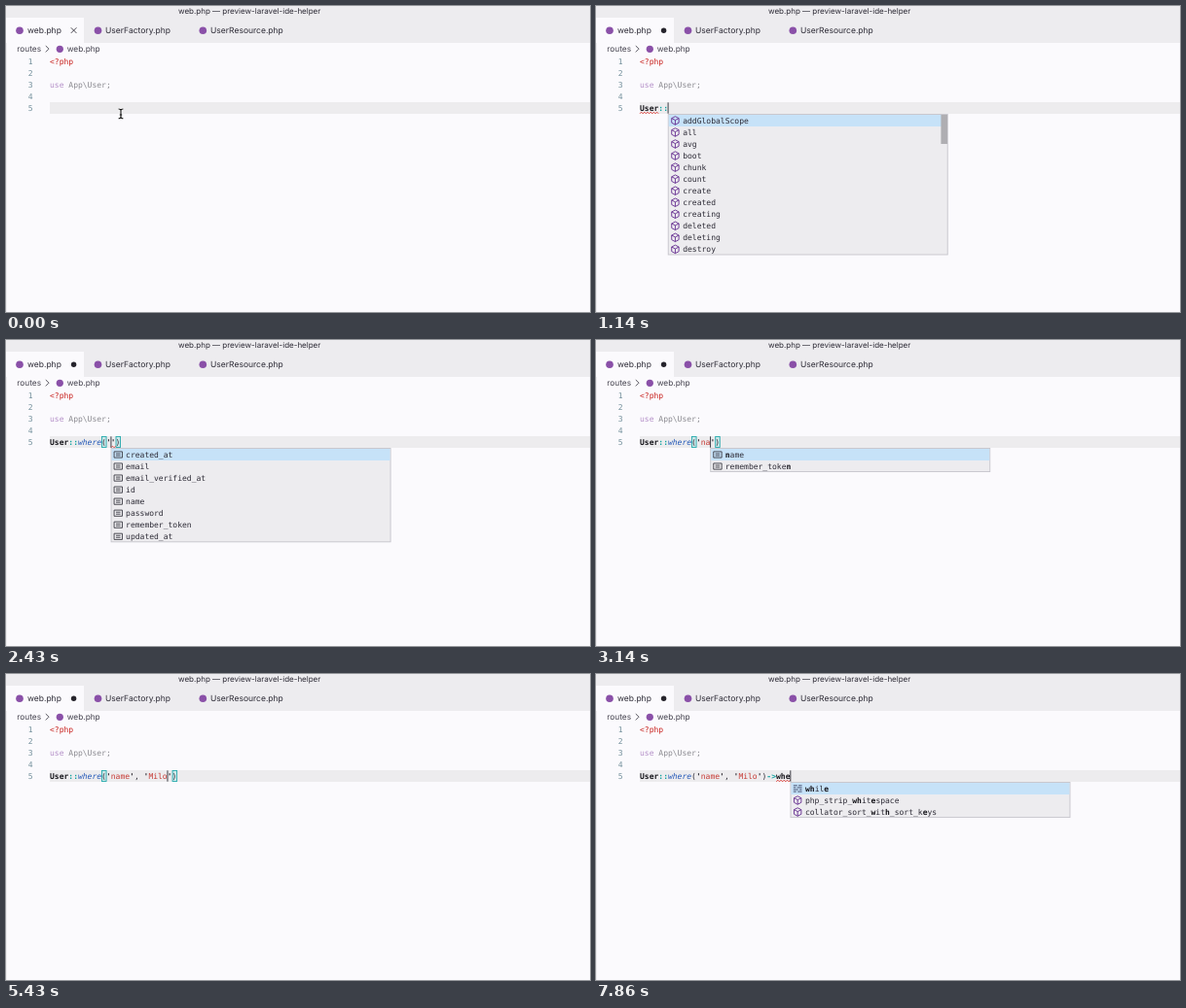
Write an HTML page that moves like this. It is 600 px wide and 315 px high and loops after 8000 ms.

```html
<!DOCTYPE html>
<html lang="en">
<head>
<meta charset="utf-8">
<title>Editor completion</title>
<style>
  html, body { margin: 0; width: 100%; height: 100%; overflow: hidden; background: #fbfafd; }
  svg { display: block; width: 600px; height: 315px; }
  text { white-space: pre; text-rendering: geometricPrecision; fill: #2d2b36; }
  .ui { font: 8.5px Inter, "Open Sans", sans-serif; }
  .title { font-size: 8px; }
  .crumb { font-size: 8.3px; fill: #45434f; }
  .mono { font: 8.03px "DejaVu Sans Mono", "Liberation Mono", monospace; }
  .num { fill: #74909c; text-anchor: end; }
  .tag { fill: #c8201c; }
  .use { fill: #b48fc8; }
  .path { fill: #8b8a90; }
  .cls, .late, .hit { font-weight: bold; fill: #17161c; }
  .op { font-weight: bold; fill: #10a3a0; }
  .fn { font-style: italic; fill: #2358b8; }
  .str { fill: #c63a34; }
  .q { font-weight: bold; fill: #26242c; }
  .eq { fill: #6b4fd0; }
  .word { fill: #2a66b8; }
  .detail { fill: #6a6973; text-anchor: end; }
  .line { fill: none; stroke-width: 0.9; }
</style>
</head>
<body>
<svg viewBox="0 0 600 315">
  <rect width="600" height="315" fill="#fbfafd"/>
  <rect width="600" height="38" fill="#edecef"/>
  <rect y="12" width="80" height="26" fill="#fbfafd"/>
  <rect y="38" width="1" height="277" fill="#edecef"/>
  <rect x="45" y="99" width="555" height="12" fill="#edecee"/>

  <text class="ui title" x="177" y="8.2">web.php — preview-laravel-ide-helper</text>
  <g fill="#8a50a8">
    <circle cx="14" cy="25.3" r="3.8"/>
    <circle cx="94.5" cy="25.3" r="3.8"/>
    <circle cx="202.3" cy="25.3" r="3.8"/>
    <circle cx="55.3" cy="44.3" r="3.6"/>
  </g>
  <text class="ui" x="22" y="28.3">web.php</text>
  <text class="ui" x="102" y="28.3">UserFactory.php</text>
  <text class="ui" x="210" y="28.3">UserResource.php</text>
  <text class="ui crumb" x="11.3" y="47.2">routes</text>
  <path class="line" d="M40.8 41l3.2 3.2-3.2 3.2" stroke="#45434f"/>
  <text class="ui crumb" x="62.7" y="47.2">web.php</text>

  <g id="numbers"></g>
  <text class="mono tag" x="45" y="59.9">&lt;?php</text>
  <text class="mono path" x="45" y="84"><tspan class="use">use</tspan> App\User;</text>
  <g id="live"></g>
</svg>
<script>
const LOOP = 8000, LEFT = 45, CHAR = 4.837, ROW = 12.04, BASE = 108.1;

const lists = {
  user: {
    detail: 'use User',
    rows: ['c User', 'c User [Illuminate\\Foundation\\Auth]', 'c UserAgent', 'c UserRequest',
      'c UserResource', 'i UserProvider', 'm user_error', 'k E_USER_ERROR', 'k E_USER_NOTICE',
      'k E_USER_WARNING', 'k E_USER_DEPRECATED', 'k SI_USER']
  },
  members: {
    rows: ['m addGlobalScope', 'm all', 'm avg', 'm boot', 'm chunk', 'm count', 'm create',
      'm created', 'm creating', 'm deleted', 'm deleting', 'm destroy']
  },
  where: {
    detail: 'whereCreatedAt($value)',
    rows: ['m whereCreatedAt', 'm whereEmail', 'm whereEmailVerifiedAt', 'm whereId', 'm whereName',
      'm wherePassword', 'm whereRememberToken', 'm whereUpdatedAt', 'm withoutEvents',
      'm with', 'm withCount', 'm without']
  },
  columns: {
    rows: ['k created_at', 'k email', 'k email_verified_at', 'k id', 'k name', 'k password',
      'k remember_token', 'k updated_at']
  },
  global: {
    rows: ['w while', 'm php_strip_whitespace', 'm collator_sort_with_sort_keys', 'm array_walk',
      'm array_walk_recursive', 'm fwrite', 'm pow', 'm rewind', 'm show_source',
      'm stream_wrapper_register', 'm ucwords', 'm wordwrap']
  }
};

const call = "User::where('name', 'Milo')";

// time, code with | as caret, completion list, query, underlined columns
const steps = [
  [0, '|'],
  [290, 'U|'],
  [430, 'U|', 'user', 'u', [0, 1]],
  [570, 'Us|', 'user', 'us', [0, 2]],
  [710, 'Use|', 'user', 'use', [0, 3]],
  [860, 'User|', 'user', 'user', [0, 4]],
  [1000, 'User:|', '', '', [0, 4]],
  [1140, 'User::|', 'members', '', [0, 4]],
  [1290, 'User::w|', 'where', 'w', [0, 4]],
  [1430, 'User::wh|', 'where', 'wh', [0, 4]],
  [1570, 'User::whe|', 'where', 'whe', [0, 4]],
  [1710, 'User::wher|', 'where', 'wher', [0, 4]],
  [1860, 'User::where|', 'where', 'where', [0, 4]],
  [2000, 'User::where|'],
  [2140, 'User::where(|)'],
  [2290, "User::where('|')"],
  [2430, "User::where('|')", 'columns', '', [13, 14]],
  [2570, "User::where('|')", 'columns', ''],
  [2860, "User::where('n|')", 'columns', ''],
  [3000, "User::where('n|')", 'columns', 'n'],
  [3140, "User::where('na|')", 'columns', 'n'],
  [3290, "User::where('na|')", 'columns', 'na'],
  [3710, "User::where('name|')"],
  [3860, "User::where('name'|)"],
  [4000, "User::where('name')|"],
  [4140, "User::where('name'|)"],
  [4290, "User::where('name',|)"],
  [4570, "User::where('name', |)"],
  [4710, "User::where('name', '|')"],
  [5000, "User::where('name', 'M|')"],
  [5140, "User::where('name', 'Mi|')"],
  [5290, "User::where('name', 'Mil|')"],
  [5430, "User::where('name', 'Milo|')"],
  [5570, "User::where('name', 'Milo'|)"],
  [5710, call + '|'],
  [6290, call + '=|'],
  [6430, call + '=>|'],
  [6570, call + '=>|', '', '', [27, 29]],
  [6860, call + '=|', '', '', [27, 28]],
  [7000, call + '|'],
  [7140, call + '-|', '', '', [27, 28]],
  [7290, call + '->|', '', '', [27, 29]],
  [7570, call + '->w|', 'global', 'w', [29, 30]],
  [7710, call + '->wh|', 'global', 'wh', [29, 31]],
  [7860, call + '->whe|', 'global', 'whe', [29, 32]]
];

const icons = {
  c: ['#d8702c', 'M-4.4-1.4l2.7-2.7 2.3 2.3-2.7 2.7zM-.6-.3h2.2M.3-.3v3.1h1.3M1.6-.3l1.3-1.3 1.3 1.3-1.3 1.3zM1.6 2.8l1.3-1.3 1.3 1.3-1.3 1.3z'],
  i: ['#1a7fc4', 'M-4.3 0a1.2 1.2 0 1 0 2.4 0a1.2 1.2 0 1 0-2.4 0M-1.9 0h2.2M.3 0a2 2 0 1 0 4 0a2 2 0 1 0-4 0'],
  m: ['#652d90', 'M0-4.3l3.7 1.9v4.6l-3.7 2-3.7-2v-4.6zM-3.7-2.4l3.7 1.9 3.7-1.9M0-.5v4.7'],
  k: ['#3c3b44', 'M-4.2-3.1h8.4v6.2h-8.4zM-2.3-1h4.6M-2.3 1h4.6'],
  w: ['#3c4566', 'M-4.4-3.2h4M.8-3.2h3.6M-4.4-1.1h2.6M-.6-1.1h5M-4.4 1h5M1.8 1h2.6M-4.4 3.1h3M0 3.1h4.4']
};

const token = /(?<cls>User(?=:))|(?<op>::|->|[:-])|(?<fn>where(?=\())|(?<str>(?<=')\w+(?='))|(?<q>')|(?<eq>=>?)|(?<late>(?<=>)w\w*)|(?<word>\w+)|(?<rest>.)/g;

const colX = col => LEFT + col * CHAR;
const span = (cls, s) => `<tspan class="${cls}">${s}</tspan>`;
const rect = (x, y, w, h, attrs) => `<rect x="${x}" y="${y}" width="${w}" height="${h}" ${attrs}/>`;
const mono = (cls, x, y, s) => `<text class="mono ${cls}" x="${x}" y="${y}">${s}</text>`;

function paint(code) {
  return [...code.matchAll(token)]
    .map(m => span(Object.keys(m.groups).find(k => m.groups[k] !== undefined), m[0]))
    .join('');
}

// Bold the query's letters in order; null when some are missing.
function highlight(label, query) {
  let at = 0, out = '';
  for (const ch of label) {
    if (at < query.length && ch.toLowerCase() === query[at]) {
      out += span('hit', ch);
      at++;
    } else out += ch;
  }
  return at === query.length ? out : null;
}

function squiggle([from, to]) {
  const end = colX(to);
  let d = '', up = false;
  for (let x = colX(from); x <= end; x += 1.6, up = !up) d += `${d ? 'L' : 'M'}${x} ${up ? 109.2 : 110.8}`;
  return `<path class="line" d="${d}" stroke="#e0352f"/>`;
}

function brackets(code, caret) {
  const open = code.indexOf('('), close = code.indexOf(')');
  if (open < 0 || caret <= open || caret > close + 1) return '';
  return [open, close].map(col =>
    rect(colX(col) + 0.3, 99.5, CHAR - 0.3, 11, 'fill="#cfe9ea" stroke="#25a9ad" stroke-width="0.9"')).join('');
}

function popup(x, { rows, detail }, query) {
  const shown = rows
    .map(r => ({ icon: icons[r[0]], label: highlight(r.slice(2), query) }))
    .filter(r => r.label !== null);
  const h = shown.length * ROW;
  let out = rect(x, 111.5, 287, h, 'fill="#edecef" stroke="#c5c4cb" stroke-width="0.9"')
    + rect(x + 0.5, 112, 286, ROW, 'fill="#c6e2f8"');
  if (shown.length > 11) out += rect(x + 280.2, 112, 6.6, 30, 'fill="#afaeb2"');
  shown.forEach(({ icon: [color, d], label }, i) => {
    const y = 118 + i * ROW;
    out += `<path class="line" d="${d}" stroke="${color}" transform="translate(${x + 7.2} ${y})"/>`
      + mono('', x + 15, y + 2.9, label);
  });
  if (detail) out += mono('detail', x + 280, 120.9, detail);
  return out;
}

function tabMark(saved) {
  return saved
    ? '<path class="line" d="M66.8 22.3l5.6 5.6M72.4 22.3l-5.6 5.6" stroke="#35333d"/>'
    : '<circle cx="69.6" cy="25.2" r="2.7" fill="#26242c"/>';
}

const pointer = ['#fff" stroke-width="2.4', '#111" stroke-width="1.1'].map(s =>
  `<path fill="none" d="M115.6 106q2.4 0 2.4 1.6q0-1.6 2.4-1.6M118 107.6v6.6M115.6 115.8q2.4 0 2.4-1.6q0 1.6 2.4 1.6M116.8 112h2.4" stroke="${s}"/>`).join('');

function scene([, marked, list, query, wave]) {
  const caret = marked.indexOf('|'), code = marked.replace('|', ''), x = colX(caret);
  return tabMark(!code)
    + brackets(code, caret)
    + mono('', LEFT, BASE, paint(code))
    + (wave ? squiggle(wave) : '')
    + (code ? rect(x - 0.4, 99.3, 0.9, 11.4, 'fill="#2b2a33"') : pointer)
    + (list ? popup(x + 0.2, lists[list], query) : '');
}

document.getElementById('numbers').innerHTML =
  [1, 2, 3, 4, 5].map(n => mono('num', 27.6, 59.9 + (n - 1) * ROW, n)).join('');

const live = document.getElementById('live');
let current;

function frame() {
  const t = performance.now() % LOOP;
  const step = steps.findLast(s => s[0] <= t);
  if (step !== current) {
    current = step;
    live.innerHTML = scene(step);
  }
  requestAnimationFrame(frame);
}
frame();
</script>
</body>
</html>
```
